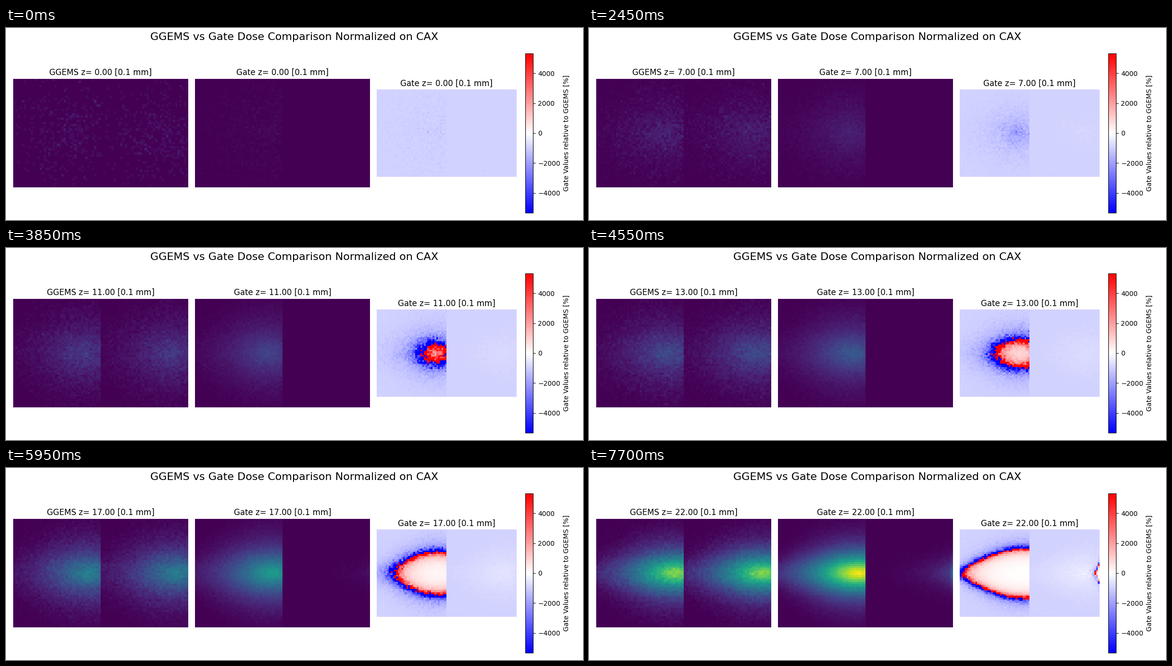
These frames come from a looping animation (1200x400 px, 8 s). A matplotlib script:

```python
import numpy as np
import matplotlib.pyplot as plt
from matplotlib.animation import FuncAnimation

STEP, HOLD, LOOP = 50, 350, 8000
ROWS, HALF = 50, 40
SLICES = 23
CUTOFF = 0.15      # Gate dose where the ratio changes sign
BASE = -950        # ratio without any dose
LIMIT = 5318
POWER = 1.4        # sharpness of the dose peak

DEPTHS = [0, 7, 11, 15, 17, 20, 22]
GGEMS_PEAK = [0.02, 0.08, 0.165, 0.32, 0.43, 0.65, 0.83]
GATE_PEAK = [0.015, 0.085, 0.20, 0.39, 0.55, 0.80, 0.99]
LEAK_PEAK = [0, 0, 0.003, 0.014, 0.032, 0.105, 0.21]

row, col = np.mgrid[:ROWS, :HALF]
dy = row - 24.6


def log_interp(z, peaks):
    return np.exp(np.interp(z, DEPTHS, np.log(peaks)))


def plume(z, peak, center, width):
    """Teardrop dose field with a sharp peak, narrowing to the left."""
    dx = col - center
    height = 9.1 + 0.25 * (22 - z)
    height = height * np.clip(1 - 0.33 * (dx / 28.5) ** 2, 0.4, 1)
    return peak * np.exp(-np.hypot(dx / width, dy / height) ** POWER)


def leak(z):
    """Dose that enters the empty half from its right edge."""
    field = np.exp(-(HALF - 1 - col) / 9 - np.abs(dy / 6) ** POWER)
    field[:, -1] *= 1.45
    return np.interp(z, DEPTHS, LEAK_PEAK) * field


def sample(rng, mean, z, quality):
    """Counting noise that weakens with dose and depth."""
    k = quality * (30 + 10 * z) * (1 + 8 * mean)
    return rng.poisson(mean * k) / k


def make_slice(z):
    rng = np.random.default_rng(100 + z)
    width = 18.5 + 0.4 * max(0, z - 11)
    left = plume(z, log_interp(z, GGEMS_PEAK), 28 + 0.36 * z, 0.95 * width)
    ggems = sample(rng, np.hstack([left, left]), z, 1)
    beam = plume(z, log_interp(z, GATE_PEAK), 33 + 0.3 * max(0, z - 11), width)
    gate = sample(rng, np.hstack([beam, leak(z) + 0.0001]), z, 4)
    gap = 1 - gate / CUTOFF
    gap = np.where(np.abs(gap) < 1e-3, 1e-3, gap)
    return ggems, gate, BASE * (1 - 1.1 * ggems) / gap


slices = [make_slice(z) for z in range(SLICES)]

# Panel layout in pixels
left, panel, pitch = 15.45, 363.18, 377.88
right = left + 2 * pitch + panel
fig, axes = plt.subplots(
    1, 3, figsize=(12, 4), dpi=100,
    gridspec_kw=dict(left=left / 1200, right=right / 1200,
                     bottom=15.4 / 400, top=1 - 53.4 / 400,
                     wspace=(pitch - panel) / panel))
fig.suptitle("GGEMS vs Gate Dose Comparison Normalized on CAX",
             fontsize=16, y=0.9775)

names = ["GGEMS", "Gate", "Gate"]
styles = [("viridis", 0, 1), ("viridis", 0, 1), ("bwr", -LIMIT, LIMIT)]
images = []
for ax, data, (cmap, low, high) in zip(axes, slices[0], styles):
    images.append(ax.imshow(data, cmap=cmap, vmin=low, vmax=high))
    ax.axis("off")
bar = fig.colorbar(images[2], ax=axes[2])
bar.set_label("Gate Values relative to GGEMS [%]")


def update(i):
    z = min(i * STEP // HOLD, SLICES - 1)
    for ax, image, name, data in zip(axes, images, names, slices[z]):
        image.set_data(data)
        ax.set_title(f"{name} z= {z:.2f} [0.1 mm]", pad=5.4)
    return images


anim = FuncAnimation(fig, update, frames=LOOP // STEP, interval=STEP,
                     repeat=True, repeat_delay=0)
plt.show()
```
